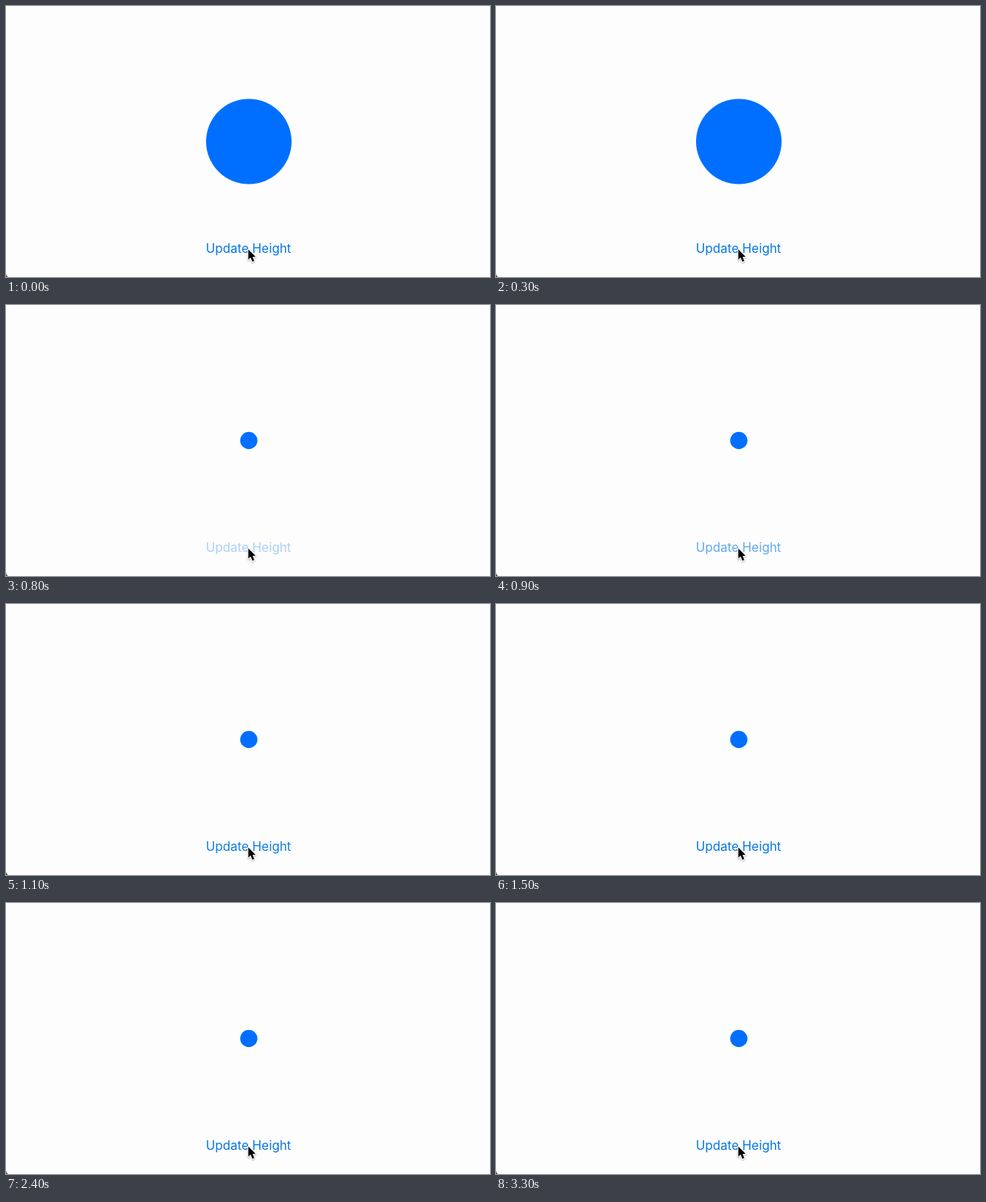
Animation, 600 px wide and 337 px high, one loop 3400 ms. Source, as an HTML page with a canvas:

```html
<!DOCTYPE html>
<html lang="en">
<head>
<meta charset="utf-8">
<title>Update Height</title>
<style>
  html, body { margin: 0; width: 100%; height: 100%; overflow: hidden; background: #fdfdfe; }
  canvas { display: block; }
</style>
</head>
<body>
<canvas id="stage" width="600" height="337"></canvas>
<script>
const ctx = document.getElementById('stage').getContext('2d');
const LOOP = 3400, STEP = 100, PRESS = 800;
const BIG = 53, SMALL = 10.7;

function polygon(points) {
  ctx.beginPath();
  points.forEach(([x, y]) => ctx.lineTo(x, y));
  ctx.closePath();
}

function drawBall(radius) {
  ctx.fillStyle = '#006fff';
  ctx.beginPath();
  ctx.arc(301, 168.5, radius, 0, Math.PI * 2);
  ctx.fill();
}

function drawLabel(alpha) {
  ctx.globalAlpha = alpha;
  ctx.fillStyle = '#0577de';
  ctx.font = '15.5px Inter, "Liberation Sans", sans-serif';
  ctx.textAlign = 'center';
  ctx.textBaseline = 'alphabetic';
  ctx.fillText('Update Height', 300.6, 307);
  ctx.globalAlpha = 1;
}

function drawPointer() {
  polygon([[300.4, 302.8], [300.4, 315.4], [303.2, 312.8], [305.5, 318],
           [307.8, 317], [305.6, 311.9], [309.4, 311.7]]);
  ctx.lineJoin = 'round';
  ctx.lineWidth = 2.2;
  ctx.strokeStyle = '#fff';
  ctx.shadowColor = 'rgba(0, 0, 0, 0.3)';
  ctx.shadowBlur = 2;
  ctx.shadowOffsetY = 1;
  ctx.stroke();
  ctx.shadowColor = 'transparent';
  ctx.fillStyle = '#000';
  ctx.fill();
}

// Dark rounded corner of the window
function drawCorner() {
  ctx.fillStyle = '#444';
  ctx.beginPath();
  ctx.moveTo(0, 333);
  ctx.quadraticCurveTo(0.4, 336, 2.8, 337);
  ctx.lineTo(0, 337);
  ctx.fill();
}

// The label dims on the press and eases back to full strength
function labelAlpha(t) {
  if (t < PRESS) return 1;
  const p = Math.min((t - PRESS) / 400, 1);
  return 1 - 0.67 * (1 - p) ** 2;
}

function draw(now) {
  const t = Math.floor((now % LOOP) / STEP) * STEP;
  ctx.fillStyle = '#fdfdfe';
  ctx.fillRect(0, 0, 600, 337);
  drawBall(t < PRESS ? BIG : SMALL);
  drawLabel(labelAlpha(t));
  drawPointer();
  drawCorner();
}

const start = performance.now();
function tick() {
  draw(performance.now() - start);
  requestAnimationFrame(tick);
}
tick();
</script>
</body>
</html>
```
